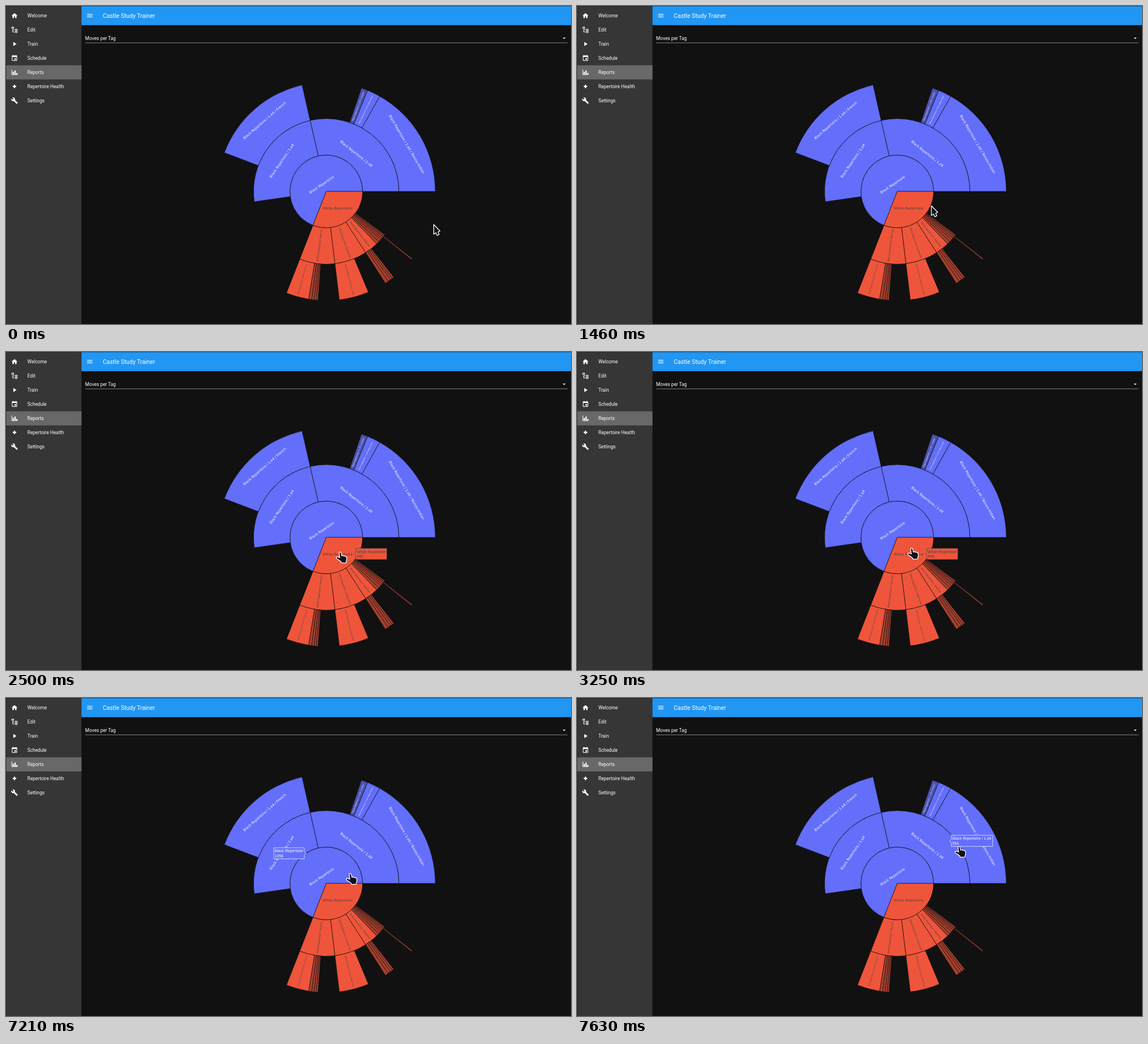
These frames come from a looping animation (998 px wide and 561 px high, 8000 ms). An HTML page:

```html
<!DOCTYPE html>
<html lang="en">
<head>
<meta charset="utf-8">
<title>Moves per Tag</title>
<style>
html, body { margin: 0; width: 100%; height: 100%; overflow: hidden; background: #111; }
svg { display: block; width: 998px; height: 561px; }
.ui { font: 8.32px Roboto, sans-serif; fill: #fff; }
.ui .title { font-size: 10.4px; }
#labels { font-family: "DejaVu Sans", sans-serif; text-anchor: middle; }
#slices { stroke: #111; stroke-width: .7; }
.tip { font: 6.76px "Liberation Sans", Arial, sans-serif; }
.tip path { stroke-width: .7; }
#cursor path { fill: #111218; stroke: #fff; stroke-width: 1.3; stroke-linejoin: round; }
</style>
</head>
<body>
<svg viewBox="0 0 998 561">
  <rect width="998" height="561" fill="#111"/>
  <g class="ui">
    <rect width="133.3" height="561" fill="#363636"/>
    <rect y="104.6" width="133.3" height="24.9" fill="#686868"/>
    <rect x="133.3" width="864.7" height="33.8" fill="#2196f3"/>
    <path d="M0 561V0H998" fill="none" stroke="#000" stroke-opacity=".6"/>
    <g id="menu"></g>
    <text class="title" x="171" y="20.8">Castle Study Trainer</text>
    <text x="139.8" y="59.5">Moves per Tag</text>
    <path d="M140 65H992" stroke="#fff" stroke-opacity=".7" stroke-width=".7"/>
  </g>
  <g id="slices"></g>
  <g id="labels"></g>
  <g id="tips"></g>
  <g id="cursor">
    <path d="M.5 .5V17.6L4.1 14.9L6.4 19.8L10 18.2L8.2 13.4L11.7 12Z"/>
    <path transform="translate(-8 -1)" d="M6 3C5.6 .3 9 .1 9.6 2.6L10.8 7.6C12.4 6.6 14 7 14.6 8.2C16 7.4 17.2 8 17.6 9C19 8.8 19.4 10 19.4 11.2L19.2 15L18 19.8L10 20.2L9 17.6L2 13C-.2 11.4 1 8.8 3.6 9.6L7 11Z"/>
  </g>
</svg>
<script>
const $ = id => document.getElementById(id);
const NS = 'http://www.w3.org/2000/svg';
const CX = 565.7, CY = 327.1, RING = 64.2;

function add(parent, tag, attrs, text) {
  const el = document.createElementNS(NS, tag);
  for (const k in attrs) el.setAttribute(k, attrs[k]);
  if (text) el.textContent = text;
  return parent.appendChild(el);
}

function polar(r, deg) {
  const a = deg * Math.PI / 180;
  return [CX + r * Math.cos(a), CY + r * Math.sin(a)];
}

// Menu
const icon = (d, x, y) => add($('menu'), 'path',
  { d, fill: '#fff', transform: `translate(${x - 6.24} ${y - 6.24}) scale(.52)` });
[
  ['Welcome', 'M10 20V14H14V20H19V12H22L12 3L2 12H5V20H10Z'],
  ['Edit', 'M12 13H7v5h5v2H5V10h2v1h5v2M8 4v2H4V4h4m2-2H2v6h8V2m10 9v2h-4v-2h4m2-2h-8v6h8V9m-2 9v2h-4v-2h4m2-2h-8v6h8v-6Z'],
  ['Train', 'M8 5.14V19.14L19 12.14Z'],
  ['Schedule', 'M19 19H5V8H19M16 1V3H8V1H6V3H5C3.9 3 3 3.9 3 5V19A2 2 0 0 0 5 21H19A2 2 0 0 0 21 19V5C21 3.9 20.1 3 19 3H18V1M17 12H12V17H17Z'],
  ['Reports', 'M22 21H2V3H4V19H6V10H10V19H12V6H16V19H18V14H22Z'],
  ['Repertoire Health', 'M18 14H14V18H10V14H6V10H10V6H14V10H18Z'],
  ['Settings', 'M22.7 19L13.6 9.9C14.5 7.6 14 4.9 12.1 3C10.1 1 7.1 .6 4.7 1.7L9 6L6 9L1.6 4.7C.4 7.1 .9 10.1 2.9 12.1C4.8 14 7.5 14.5 9.8 13.6L18.9 22.7C19.3 23.1 19.9 23.1 20.3 22.7L22.6 20.4C23.1 20 23.1 19.3 22.7 19Z']
].forEach(([name, d], i) => {
  const y = 17.1 + i * 24.96;
  icon(d, 15, y);
  add($('menu'), 'text', { x: 37.8, y: y + 3 }, name);
});
icon('M3 6H21V8H3V6M3 11H21V13H3V11M3 16H21V18H3Z', 148, 17);
icon('M7 10L12 15L17 10Z', 986, 56.8);

// Tag tree: name, moves tagged directly, children, options.
// "at" sets a label across the slice at that radius; other labels run along the spoke.
const tag = (name, own, kids = [], opts = {}) => ({
  name, own, kids, ...opts, total: kids.reduce((sum, k) => sum + k.total, own)
});
function smallTags(n, total) {
  const weight = i => .82 ** i, unit = total * .18 / (1 - weight(n));
  return Array.from({ length: n }, (_, i) => tag('', unit * weight(i)));
}
const rare = smallTags(6, 166);
rare[4].own -= 11;
rare[4].kids.push(tag('', 11));

const tree = [
  tag('Black Repertoire', 1058, [
    tag('1.d4', 554, [
      tag('Nimzo-Indian', 1062, [], { at: 164.8 }),
      tag('Bogo-Indian', 124),
      tag('Catalan', 60)
    ], { at: 85.3, tip: [661.2, 242.2, 73, -1] }),
    tag('1.e4', 507, [tag('French', 987, [], { at: 166 })], { at: 95.4 })
  ], { at: 14.5, tip: [473, 264.2, 53.8, 1], fill: '#636efa', dark: '#4a52b4', ink: '#fff' }),
  tag('White Repertoire', 640, [
    tag('Normal', 197, [tag('Classical', 212), ...smallTags(4, 86)]),
    tag('Queenside', 177, [tag('Main', 277)]),
    tag('Addition', 100, smallTags(4, 95)),
    ...rare
  ], { at: 35.5, level: true, tip: [618, 346.4, 54.7, -1], fill: '#ef553b', dark: '#a8402e', ink: '#444' })
];
const DEG = 360 / (tree[0].total + tree[1].total);
const nodes = [];

// Siblings run counter-clockwise from the given angle
function place(list, ring, angle, parent) {
  for (const n of list) {
    if (parent) {
      n.name = n.name && `${parent.name} / ${n.name}`;
      n.fill = parent.fill;
      n.dark = parent.dark;
      n.ink = parent.ink;
    }
    n.ring = ring;
    n.to = angle;
    n.from = angle -= n.total * DEG;
    nodes.push(n);
    place(n.kids, ring + 1, n.to, n);
  }
}
place(tree, 0, 360);

function drawSlice({ ring, from, to, total, fill, dark }) {
  const r0 = ring * RING, r1 = r0 + RING, big = +(to - from > 180);
  add($('slices'), 'path', { fill: total < 65 ? dark : fill, d:
    `M${polar(r0, from)}L${polar(r1, from)}A${r1} ${r1} 0 ${big} 1 ${polar(r1, to)}` +
    `L${polar(r0, to)}A${r0} ${r0} 0 ${big} 0 ${polar(r0, from)}Z` });
}

function drawLabel({ name, ring, from, to, at, level, ink }) {
  const mid = (from + to) / 2;
  const upright = a => a - 180 * Math.round(a / 180);
  const turn = level ? 0 : upright(at ? mid + 90 : mid);
  const size = at ? 6.24 : 62 / (name.length * .56);
  const [x, y] = polar(at || (ring + .5) * RING, mid);
  add($('labels'), 'text', { fill: ink, 'font-size': size, dy: '.36em',
    transform: `translate(${x} ${y}) rotate(${turn})` }, name);
}

// Tooltip side: -1 points left, 1 points right
function drawTip({ name, own, fill, ink, tip: [x, y, w, side] }) {
  const h = 19.6, m = y + h / 2;
  const g = add($('tips'), 'g', { class: 'tip', fill: ink });
  const left = side < 0 ? `V${m + 3}L${x - 3} ${m}L${x} ${m - 3}` : '';
  const right = side > 0 ? `V${m - 3}L${x + w + 3} ${m}L${x + w} ${m + 3}` : '';
  add(g, 'path', { d: `M${x} ${y}H${x + w}${right}V${y + h}H${x}${left}Z`, fill, stroke: ink });
  add(g, 'text', { x: x + 1.8, y: y + 8.1 }, name);
  add(g, 'text', { x: x + 1.8, y: y + 16.9 }, own);
  return g;
}

for (const n of nodes) {
  drawSlice(n);
  if (n.name) drawLabel(n);
  if (n.tip) n.tipEl = drawTip(n);
}

// Pointer moves: each goes straight to x, y in equal hops between two times
const HOME = [755, 385];
const moves = [
  { start: 1040, end: 1080, hops: 2, x: 720.5, y: 367.5 },
  { start: 1460, end: 1460, hops: 1, x: 625.5, y: 352 },
  { start: 1540, end: 1790, hops: 4, x: 615, y: 350.5 },
  { start: 2130, end: 2210, hops: 2, x: 590.5, y: 353 },
  { start: 3250, end: 3540, hops: 5, x: 595, y: 319.3 },
  { start: 7210, end: 7630, hops: 6, x: 675, y: 261.8 }
];

function pointerAt(t) {
  let [x, y] = HOME;
  for (const m of moves) {
    if (t < m.start) break;
    const gap = (m.end - m.start) / (m.hops - 1);
    const hop = t >= m.end ? m.hops : 1 + Math.floor((t - m.start) / gap);
    x += (m.x - x) * hop / m.hops;
    y += (m.y - y) * hop / m.hops;
  }
  return [x, y];
}

function sliceAt(x, y) {
  const ring = Math.floor(Math.hypot(x - CX, y - CY) / RING);
  const deg = (Math.atan2(y - CY, x - CX) * 180 / Math.PI + 360) % 360;
  return nodes.find(n => n.ring === ring && n.from <= deg && deg < n.to);
}

const [arrow, hand] = $('cursor').children;
const show = (el, on) => el.style.display = on ? '' : 'none';

function draw(t) {
  const [x, y] = pointerAt(t);
  const over = sliceAt(x, y);
  $('cursor').setAttribute('transform', `translate(${x} ${y})`);
  show(arrow, !over);
  show(hand, over);
  for (const n of nodes) if (n.tipEl) show(n.tipEl, n === over);
}
draw(0);
let start;
requestAnimationFrame(function loop(now) {
  start ??= now;
  draw((now - start) % 8000);
  requestAnimationFrame(loop);
});
</script>
</body>
</html>
```
